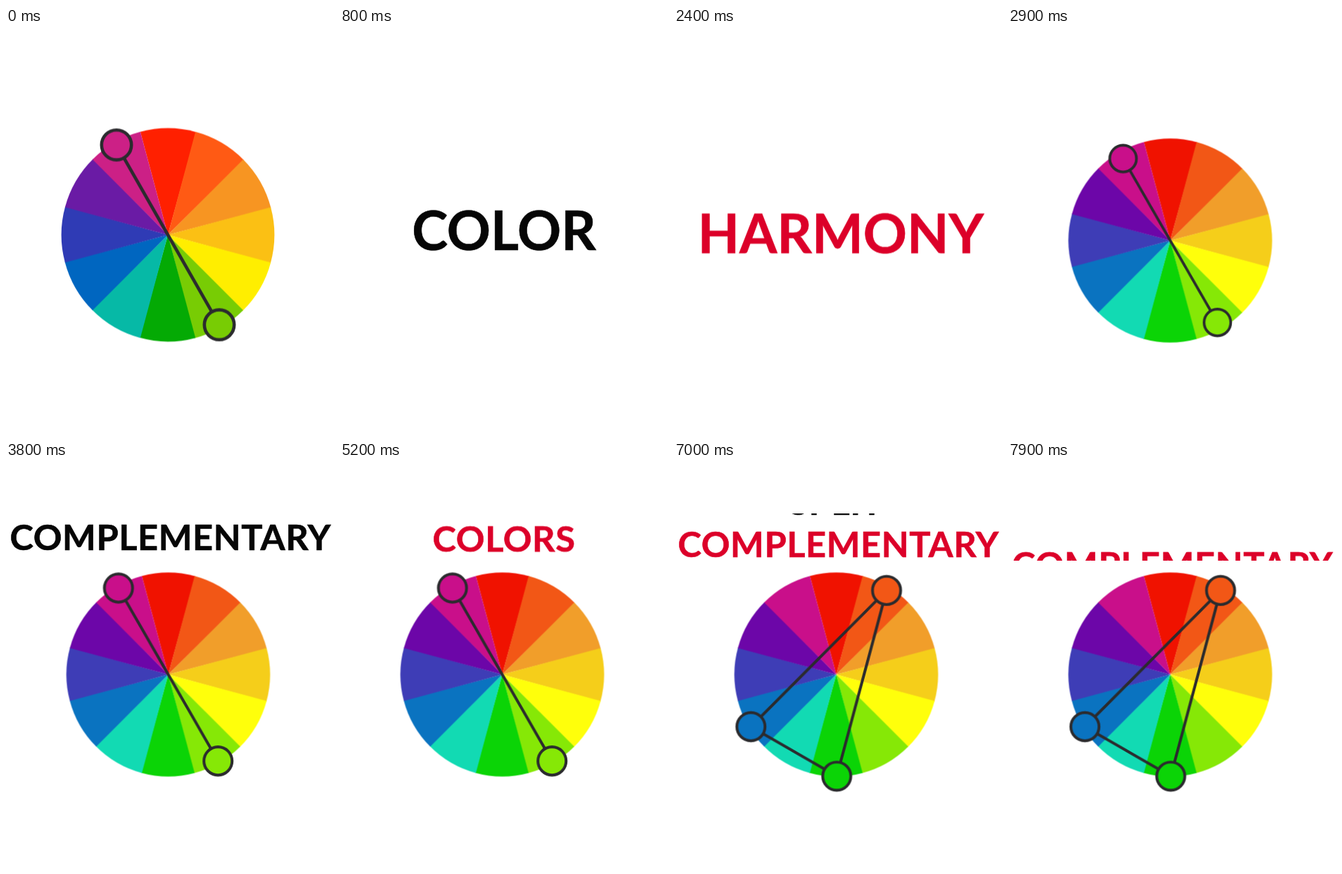
Recreate the animation shown at these times as an HTML page. Size 466 by 576 pixels, loop 8000 ms.

```html
<!DOCTYPE html>
<html lang="en">
<head>
<meta charset="utf-8">
<title>Color harmony</title>
<style>
  html, body { margin: 0; width: 100%; height: 100%; overflow: hidden; background: #fff; }
  svg { display: block; width: 466px; height: 576px; }

  text { font-family: Lato, "Open Sans", sans-serif; font-weight: 700; text-anchor: middle; stroke-width: .6; }
  .big { font-size: 77px; --step: 92px; }
  .small { font-size: 50.5px; letter-spacing: .6px; --step: 60px; }
  .dark { fill: #060606; stroke: #060606; }
  .red { fill: #dc0029; stroke: #dc0029; }

  .nodes { stroke: #2b2b2e; stroke-width: 4; }
  .nodes path { fill: none; stroke-linejoin: round; }

  .anim { animation: 8s linear infinite both; }
  .first-wheel { animation-name: first-wheel; }
  .second-wheel { animation-name: second-wheel; }
  .pair { animation-name: pair; }
  .triad { animation-name: triad; }
  .color { animation-name: color; }
  .harmony { animation-name: harmony; }
  .complementary { animation-name: complementary; }
  .colors { animation-name: colors; }
  .split { animation-name: split; }
  .split-complementary { animation-name: split-complementary; }

  @keyframes first-wheel {
    0%, 0.75% { transform: scale(1); animation-timing-function: cubic-bezier(.32, 0, .67, 0); }
    3.75%, 100% { transform: scale(0); }
  }
  @keyframes second-wheel {
    0%, 30.6% { transform: scale(0); animation-timing-function: cubic-bezier(.22, 1, .36, 1); }
    36.8%, 100% { transform: scale(1); }
  }
  @keyframes pair {
    0%, 31.575% { transform: scale(0); animation-timing-function: cubic-bezier(.33, 1, .68, 1); }
    39.75% { transform: scale(1.03); animation-timing-function: ease-in-out; }
    45%, 66% { transform: scale(1); animation-timing-function: cubic-bezier(.32, 0, .67, 0); }
    67.9%, 100% { transform: scale(0); }
  }
  @keyframes triad {
    0%, 67.9% { transform: scale(0); animation-timing-function: cubic-bezier(.33, 1, .68, 1); }
    74.75% { transform: scale(1.03); animation-timing-function: ease-in-out; }
    80%, 100% { transform: scale(1); }
  }

  /* Words drop in from above, get pushed up by the next one, or drop out below. */
  @keyframes color {
    0%, 3.125% { transform: translateY(calc(-1 * var(--step))); animation-timing-function: cubic-bezier(.22, 1, .36, 1); }
    13.75%, 16.875% { transform: translateY(0); animation-timing-function: cubic-bezier(.22, 1, .36, 1); }
    27.5%, 100% { transform: translateY(calc(-1 * var(--step))); }
  }
  @keyframes harmony {
    0%, 16.875% { transform: translateY(var(--step)); animation-timing-function: cubic-bezier(.22, 1, .36, 1); }
    27.5%, 29.25% { transform: translateY(0); animation-timing-function: cubic-bezier(.32, 0, .67, 0); }
    31.575%, 100% { transform: translateY(var(--step)); }
  }
  @keyframes complementary {
    0%, 38.75% { transform: translateY(calc(-1 * var(--step))); animation-timing-function: cubic-bezier(.22, 1, .36, 1); }
    49.375%, 51.875% { transform: translateY(0); animation-timing-function: cubic-bezier(.22, 1, .36, 1); }
    62.5%, 100% { transform: translateY(calc(-1 * var(--step))); }
  }
  @keyframes colors {
    0%, 51.875% { transform: translateY(var(--step)); animation-timing-function: cubic-bezier(.22, 1, .36, 1); }
    62.5%, 64.25% { transform: translateY(0); animation-timing-function: cubic-bezier(.32, 0, .67, 0); }
    66.575%, 100% { transform: translateY(var(--step)); }
  }
  @keyframes split {
    0%, 70.625% { transform: translateY(calc(-1 * var(--step))); animation-timing-function: cubic-bezier(.22, 1, .36, 1); }
    81.25%, 84.3% { transform: translateY(0); animation-timing-function: cubic-bezier(.22, 1, .36, 1); }
    94.925%, 100% { transform: translateY(calc(-1 * var(--step))); }
  }
  @keyframes split-complementary {
    0%, 84.3% { transform: translateY(var(--step)); animation-timing-function: cubic-bezier(.22, 1, .36, 1); }
    94.925%, 96.75% { transform: translateY(0); animation-timing-function: cubic-bezier(.32, 0, .67, 0); }
    99.075%, 100% { transform: translateY(var(--step)); }
  }
</style>
</head>
<body>
<svg viewBox="0 0 466 576">
  <defs>
    <clipPath id="middle"><rect y="235" width="466" height="116"/></clipPath>
    <clipPath id="top"><rect y="73" width="466" height="67"/></clipPath>
  </defs>

  <g transform="translate(230 293.5)">
    <g class="anim first-wheel">
      <g id="wheelA"></g>
      <g id="pairA" class="nodes" style="stroke-width:4.6"></g>
    </g>
  </g>

  <g transform="translate(230.5 301.5)">
    <g id="wheelB" class="anim second-wheel"></g>
    <g id="pairB" class="anim nodes pair"></g>
    <g id="triad" class="anim nodes triad"></g>
  </g>

  <g clip-path="url(#middle)" class="big">
    <text class="anim dark color" x="233" y="316">COLOR</text>
    <text class="anim red harmony" x="237" y="316">HARMONY</text>
  </g>
  <g clip-path="url(#top)" class="small">
    <text class="anim dark complementary" x="233.7" y="125">COMPLEMENTARY</text>
    <text class="anim red colors" x="233" y="125">COLORS</text>
    <text class="anim dark split" x="230" y="125">SPLIT</text>
    <text class="anim red split-complementary" x="233.7" y="125">COMPLEMENTARY</text>
  </g>
</svg>
<script>
  // Clockwise from the top slice.
  const deep = ['#ff2000', '#ff5a14', '#f79522', '#fbc014', '#ffee00', '#78cc04',
                '#04aa04', '#06b9a6', '#0066c0', '#2f3bb5', '#6a1ba5', '#cc2086'];
  const bright = ['#f01200', '#f25716', '#f19e2a', '#f5ce1a', '#ffff0b', '#86e806',
                  '#0bd406', '#12dab3', '#0a73c0', '#3e3db6', '#6c06a8', '#c90f8a'];

  const byId = id => document.getElementById(id);

  function rim(degrees, radius) {
    const a = degrees * Math.PI / 180;
    return `${(radius * Math.sin(a)).toFixed(2)} ${(-radius * Math.cos(a)).toFixed(2)}`;
  }

  function drawWheel(id, colors, radius) {
    byId(id).innerHTML = colors.map((color, i) => {
      // A slight overlap hides the seams between slices.
      const from = i * 30 - 15, to = from + (i < 11 ? 30.4 : 30);
      return `<path fill="${color}" d="M0 0L${rim(from, radius)}A${radius} ${radius} 0 0 1 ${rim(to, radius)}Z"/>`;
    }).join('');
  }

  function drawNodes(id, nodes, radius) {
    const line = nodes.map(n => `${n.x} ${n.y}`).join('L');
    byId(id).innerHTML = `<path d="M${line}Z"/>` + nodes.map(n =>
      `<circle cx="${n.x}" cy="${n.y}" r="${radius}" fill="${n.color}"/>`).join('');
  }

  const opposite = (x, y, colors) => [
    { x: -x, y: -y, color: colors[11] },
    { x, y, color: colors[5] }
  ];

  drawWheel('wheelA', deep, 151.3);
  drawNodes('pairA', opposite(73, 127.6, deep), 21.2);
  drawWheel('wheelB', bright, 144.7);
  drawNodes('pairB', opposite(70.7, 122.7, bright), 20);
  drawNodes('triad', [
    { x: 71.5, y: -119.3, color: bright[1] },
    { x: -121.2, y: 74, color: bright[8] },
    { x: 0.7, y: 144.2, color: bright[6] }
  ], 20);
</script>
</body>
</html>
```
